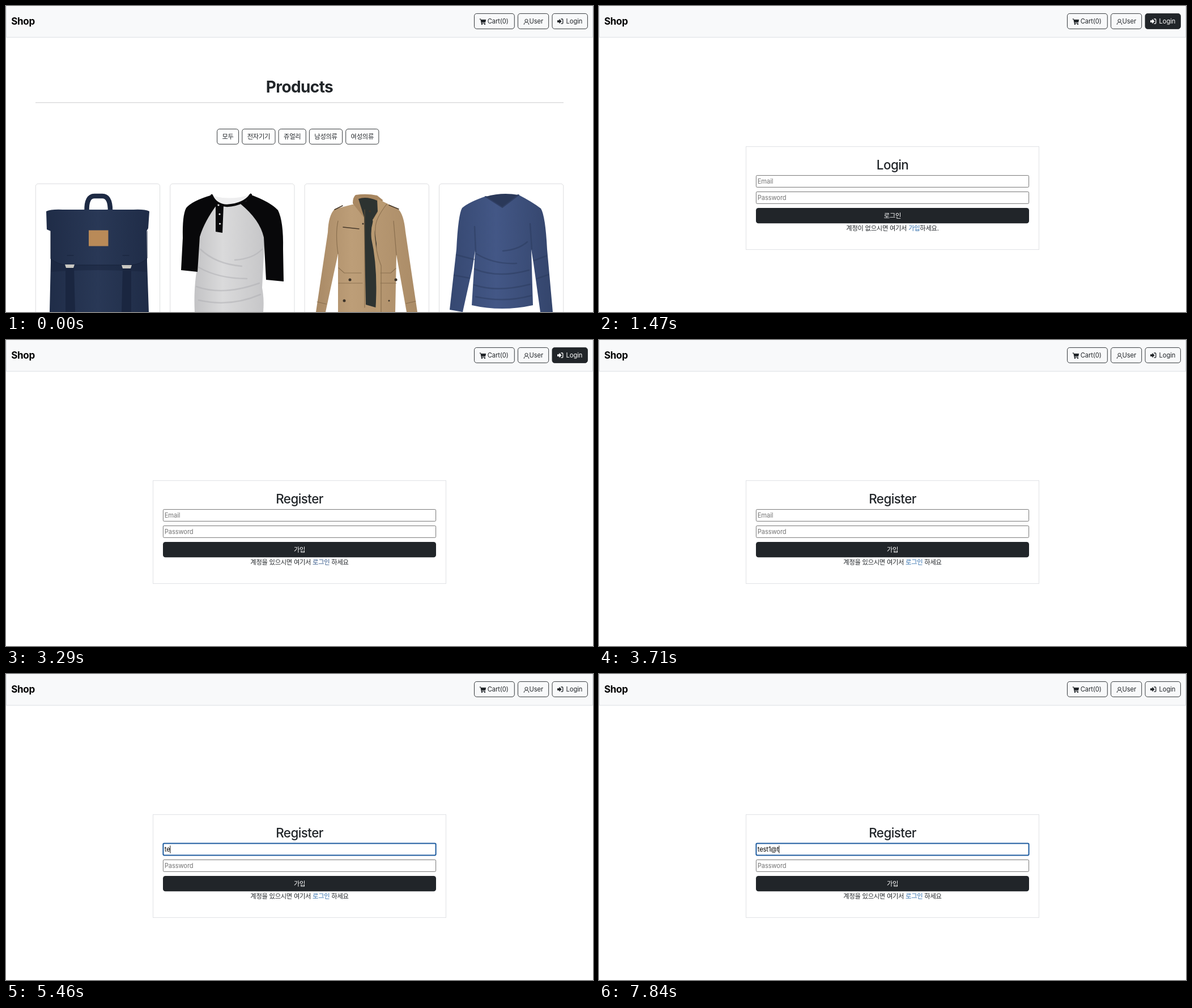
An HTML page for the animation above (8000 ms loop, 1036 by 541 pixels).

```html
<!DOCTYPE html>
<html lang="ko">
<head>
<meta charset="utf-8">
<title>Shop</title>
<style>
html, body { margin: 0; width: 100%; height: 100%; overflow: hidden; background: #fff; }
svg { display: block; width: 100%; height: 100%; }
text {
  font: 11.2px Inter, "Noto Sans CJK KR", "Noto Sans CJK", "Noto Sans", sans-serif;
  font-optical-sizing: none; letter-spacing: -.01em; fill: #212529; white-space: pre;
}
.ko { font-size: 11.3px; letter-spacing: -.025em; text-anchor: middle; }
.brand { font-size: 17px; font-weight: 700; letter-spacing: -.02em; fill: #000; }
.h1 { font-size: 28px; font-weight: 700; letter-spacing: -.022em; text-anchor: middle; }
.h2 { font-size: 22.4px; font-weight: 500; letter-spacing: -.025em; text-anchor: middle; }
.hint { fill: #757575; }
.btn { fill: none; stroke: #212529; stroke-width: .9; }
.card { fill: #fff; stroke: #dcdddf; }
.input { fill: #fff; stroke: #767676; }
.fold { fill: none; stroke-linecap: round; stroke-width: 2.5; }
</style>
</head>
<body>
<svg viewBox="0 0 1036 541" preserveAspectRatio="none">
  <defs>
    <linearGradient id="pack"><stop stop-color="#1f2c47"/><stop offset=".5" stop-color="#293856"/><stop offset="1" stop-color="#1f2c47"/></linearGradient>
    <linearGradient id="gray"><stop stop-color="#c3c3c5"/><stop offset=".4" stop-color="#dadadb"/><stop offset="1" stop-color="#c6c6c8"/></linearGradient>
    <linearGradient id="tan"><stop stop-color="#a98a66"/><stop offset=".35" stop-color="#bd9e78"/><stop offset="1" stop-color="#ab8c67"/></linearGradient>
    <linearGradient id="blue"><stop stop-color="#364871"/><stop offset=".45" stop-color="#435786"/><stop offset="1" stop-color="#34456c"/></linearGradient>
  </defs>

  <rect width="1036" height="55" fill="#f8f9fa"/>
  <path d="M.5 0V55.3H1035.5V0" fill="none" stroke="#dbe0e4"/>
  <text class="brand" x="9.3" y="33">Shop</text>
  <rect class="btn" x="826.5" y="13.4" width="70.8" height="27" rx="4.3"/>
  <rect class="btn" x="903.5" y="13.4" width="54.2" height="27" rx="4.3"/>
  <g fill="#212529">
    <path d="M835.8 22.4h2.2l.4 1.6h8.8l-1.1 5.3h-6.3l.2.9h5.7v1.1h-6.8l-1.6-7.6h-1.5z"/>
    <circle cx="839.9" cy="32.1" r="1.2"/><circle cx="845" cy="32.1" r="1.2"/>
  </g>
  <g fill="none" stroke="#212529" stroke-width="1">
    <circle cx="918.5" cy="26" r="2.6"/>
    <path d="M914.2 33c.1-3 1.8-4.3 4.3-4.3s4.2 1.3 4.3 4.3"/>
  </g>
  <text x="849.8" y="31">Cart(0)</text>
  <text x="923.6" y="31">User</text>
  <g id="login">
    <rect x="964" y="13.4" width="62.4" height="27" rx="4.3" stroke-width=".9"/>
    <path d="M973 25.3h3.3v-2.6l4.4 4.4-4.4 4.4v-2.6H973z"/>
    <path d="M979.4 23h2.2q1.2 0 1.2 1.2v5.8q0 1.2-1.2 1.2h-2.2" fill="none" stroke-width="1.3"/>
    <text x="988.6" y="31">Login</text>
  </g>

  <g id="shop">
    <text class="h1" x="518" y="152.8">Products</text>
    <path d="M52 170.8H984" stroke="#dcdcdd" stroke-width="1.4"/>
    <g id="filters"></g>
    <g id="cards"></g>

    <g>
      <path d="M142.500 362Q142 336 156 336H170Q184 336 184 362" fill="none" stroke="#1d2a44" stroke-width="8.500"/>
      <path d="M71 363Q80 359 100 360H225Q245 359 253 363L251 393L248 398L249 452L252 541H77L79 452V398L72 395Z" fill="url(#pack)"/>
      <path d="M79 447Q90 457 105 458H222Q238 457 249 446V470Q160 464 79 470Z" fill="#17223a" opacity=".45"/>
      <path class="fold" d="M79 398V447Q92 457 107 458H220Q238 457 249 446V398M108 441h11M206 441h11" stroke="#17223a" style="stroke-width:1"/>
      <path d="M105 462h15l2 79h-17zM206 463h15v78h-17z" fill="#1a2640"/>
      <path d="M104 457h17l-2 6h-13zM204 458h18l-2 6h-14z" fill="#c9c8c2"/>
      <rect x="146" y="396.500" width="34.500" height="28" fill="#b98a58"/>
    </g>

    <g>
      <path d="M366 342L342 405L337 465Q331 500 333 541H454Q456 518 452 498L457 405L424 342Q392 360 366 342Z" fill="url(#gray)"/>
      <path d="M364 334Q329 344 318 357Q311 370 312 410L309 467L338 470L342 408Q350 381 373 350ZM430 333Q466 346 480 361Q490 381 489 430L490 487L459 484L455 409Q448 378 414 350Z" fill="#08080a"/>
      <path d="M366 336Q398 344 430 334L424 345Q400 356 372 347Z" fill="#eeeeef"/>
      <path class="fold" d="M363 335Q370 352 390 353Q420 351 432 334" stroke="#08080a" style="stroke-width:4.500"/>
      <path d="M370 350L384 352L382 401L370 399Z" fill="#08080a"/>
      <g fill="#e5e5e5"><circle cx="375" cy="352" r="1.600"/><circle cx="377" cy="368" r="1.600"/><circle cx="377.500" cy="385" r="1.600"/></g>
      <path class="fold" d="M343 430Q370 456 416 460M340 462Q375 482 425 482M336 496Q383 513 447 490M340 520Q396 533 449 510M452 430Q436 447 404 449" stroke="#aeaeb1" opacity=".5"/>
    </g>

    <g>
      <path d="M611 351L580 359Q569 370 568 400L547 541H564L586 438V541H687L689 440L707 541H726L705 399Q702 368 692 359L664 345Z" fill="url(#tan)"/>
      <path d="M612 349Q612 338 617 334Q637 331 655 335L665 343L660 364L649 377H634Z" fill="#a88761"/>
      <path d="M622 341Q636 336 655 344L656 363L647 378L654 420L656 534L635 528L632 373Z" fill="#2d3331"/>
      <path d="M656 341L672 350Q659 371 651 377Q647 412 662 459L660 541H652Q657 465 645 412Q642 384 656 365Z" fill="#b99a72"/>
      <path class="fold" d="M633 360V533M672 350Q652 376 652 392Q650 430 662 459V541M586 438Q581 403 586 380M689 440L684 380M587 463l10 9h30M688 464l-9 8h-18M587 490h42M661 490h28M549 523l16 4M706 526l17-4" stroke="#755c3f" opacity=".65" style="stroke-width:1.200"/>
      <path class="fold" d="M595 391L623 394M580 360l14-7M693 359l-17-7" stroke="#46382a" style="stroke-width:1.600"/>
      <g fill="#3d342a"><circle cx="607" cy="484" r="2.500"/><circle cx="688" cy="484" r="2.500"/><circle cx="597" cy="521" r="2.500"/><circle cx="642" cy="363" r="2"/><circle cx="630" cy="385" r="1.500"/><circle cx="676" cy="521" r="1.500"/></g>
    </g>

    <g>
      <path d="M848 336Q818 346 805 357Q798 369 795 430L783 537L806 541L823 464L828 432L822 529Q875 541 930 529L927 430L931 455L943 541H965L955 430Q952 371 944 358Q930 347 903 333L876 355Z" fill="url(#blue)"/>
      <path d="M847 337Q875 329 904 334L876 356Z" fill="#2a3859"/>
      <path class="fold" d="M846 337L876 356L905 334" stroke="#303f64" style="stroke-width:2"/>
      <path class="fold" d="M827 390L829 434M925 385L928 430M830 438Q861 457 901 455M827 465Q868 482 923 467M826 493Q867 507 925 492M829 514Q880 525 927 512M795 440l31 8M932 450l21-8M791 476l27 5M937 482l20-7M920 417Q904 431 877 433" stroke="#293859" opacity=".45"/>
    </g>
  </g>

  <g id="form">
    <rect x="259.500" y="248.600" width="517" height="182" fill="#fff" stroke="#e0e2e5"/>
    <text id="title" class="h2" x="518" y="288.700"></text>
    <rect id="email" class="input" x="277.400" y="299.600" width="481.200" height="20.800" rx="1.800"/>
    <rect id="pass" class="input" x="277.400" y="328.500" width="481.200" height="20.800" rx="1.800"/>
    <text id="value" x="279.700" y="314.400"></text>
    <path id="caret" d="M0 303.300V317" stroke="#000" stroke-width=".9"/>
    <text class="hint" x="279.700" y="343.200">Password</text>
    <rect x="277" y="357" width="482" height="27.200" rx="4.300" fill="#212529"/>
    <text id="submit" class="ko" x="518" y="374.500" style="fill:#fff"></text>
    <text class="ko" x="518" y="397"><tspan id="ask"></tspan><tspan id="link"></tspan><tspan id="tail"></tspan></text>
  </g>
</svg>
<script>
const $ = id => document.getElementById(id);
const LOOP = 8000;
const between = (t, a, b) => t >= a && t < b;
const setText = (id, s) => { if ($(id).textContent !== s) $(id).textContent = s; };
const show = (id, on) => $(id).setAttribute('display', on ? 'inline' : 'none');

const filters = [['모두', 372.6, 38], ['전자기기', 416.8, 58.2], ['쥬얼리', 481.1, 48.2],
  ['남성의류', 535.4, 58.2], ['여성의류', 599.7, 58.2]];
$('filters').innerHTML = filters.map(([label, x, w]) =>
  `<rect class="btn" x="${x}" y="217.500" width="${w}" height="26.800" rx="4.300"/>
   <text class="ko" x="${x + w / 2}" y="235">${label}</text>`).join('');
$('cards').innerHTML = [0, 1, 2, 3].map(i =>
  `<rect class="card" x="${52.3 + i * 237.4}" y="314.300" width="219.300" height="300" rx="4.500"/>`).join('');

const loginLooks = {
  idle: ['#f8f9fa', '#212529', '#212529'],
  fading: ['#7c7e80', '#54575a', '#adafb1'],
  active: ['#212529', '#212529', '#ffffff']
};
const pages = {
  login: ['Login', '로그인', '계정이 없으시면 여기서 ', '가입', '하세요.'],
  register: ['Register', '가입', '계정을 있으시면 여기서 ', '로그인', ' 하세요']
};
const typed = 'test1@t';
const keyTimes = [4970, 5460, 5880, 6090, 6790, 7350, 7840];
const caretGaps = [[4760, 4970], [6650, 6790], [7280, 7350]];

function paintLogin(t) {
  const look = between(t, 1400, 1470) || between(t, 3360, 3430) ? 'fading'
    : between(t, 1470, 3360) ? 'active' : 'idle';
  const [fill, edge, ink] = loginLooks[look];
  const [box, arrow, door, label] = $('login').children;
  box.setAttribute('fill', fill);
  box.setAttribute('stroke', edge);
  arrow.setAttribute('fill', ink);
  door.setAttribute('stroke', ink);
  label.style.fill = ink;
}

function paintForm(t) {
  const page = pages[t < 3290 ? 'login' : 'register'];
  ['title', 'submit', 'ask', 'link', 'tail'].forEach((id, i) => setText(id, page[i]));
  $('link').style.fill = between(t, 2870, 3710) ? '#2c5185' : '#2f6dac';

  const focus = t >= 4200;
  const hover = between(t, 2170, 2240) || between(t, 4130, 4200);
  $('email').style.stroke = focus ? '#1d5b9f' : hover ? '#4a4a4a' : '#767676';
  $('email').style.strokeWidth = focus ? 2 : 1;
  $('pass').style.stroke = between(t, 3780, 3920) ? '#4a4a4a' : '#767676';

  const count = keyTimes.filter(k => t >= k).length;
  setText('value', count ? typed.slice(0, count) : 'Email');
  $('value').style.fill = count ? '#000' : '#757575';
  show('caret', focus && !caretGaps.some(([a, b]) => between(t, a, b)));
  const x = 280.2 + (count ? $('value').getComputedTextLength() - .2 : 0);
  $('caret').setAttribute('transform', `translate(${x} 0)`);
}

function render(t) {
  show('shop', t < 1470);
  show('form', t >= 1470);
  paintLogin(t);
  paintForm(t);
}

function tick() {
  render(performance.now() % LOOP);
  requestAnimationFrame(tick);
}
tick();
</script>
</body>
</html>
```
